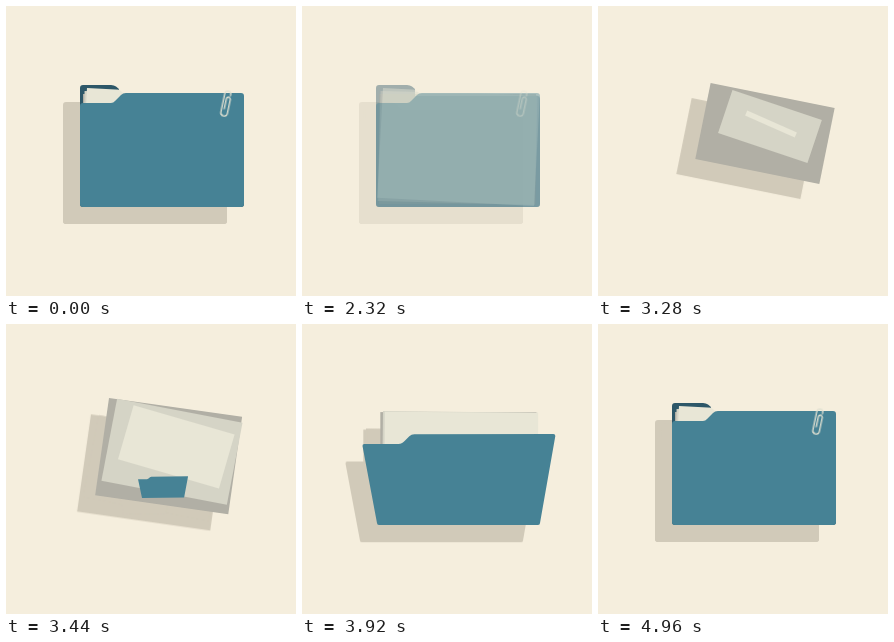
Write an HTML page that moves like this. It is 290 by 290 pixels and loops after 5 s.

```html
<!DOCTYPE html>
<html lang="en">
<head>
<meta charset="utf-8">
<title>Folder</title>
<style>
html, body { margin: 0; width: 100%; height: 100%; overflow: hidden; background: #f5eedd; }
svg { display: block; width: 100vw; height: 100vh; }

/* Every part runs on the same five second loop. */
.part, .sheet, .front, .back, .clip, .shade, .mask {
  animation: 5s linear infinite backwards;
}

/* Parts dissolve one by one; the shadow dissolves as a whole. */
.part { --a: 1; animation-name: var(--fade, fade); }
.late { --a: 0; }
@keyframes fade {
  0%, 40% { opacity: 1; animation-timing-function: cubic-bezier(.61, 1, .88, 1); }
  56%, 58.29% { opacity: 0; }
  58.3%, 60.7% { opacity: var(--a); }
  60.75%, 100% { opacity: 1; }
}
@keyframes gate {
  0%, 55.9% { opacity: 1; }
  56%, 58.29% { opacity: 0; }
  58.3%, 60.7% { opacity: var(--a); }
  60.75%, 100% { opacity: 1; }
}

.shade { --tint: #d1cab9; --fade: gate; animation-name: shade; }
@keyframes shade {
  0%, 40% { opacity: 1; transform: translate(-17px, 17px); animation-timing-function: cubic-bezier(.61, 1, .88, 1); }
  56% { opacity: 0; transform: translate(-17px, 17px); }
  58.29% { opacity: 0; transform: translate(1px, 13px); }
  58.3%, 58.4% { opacity: 1; transform: translate(1px, 13px); }
  65.6% { opacity: 1; transform: translate(-19px, 15px); }
  72.8% { opacity: 1; transform: translate(-17px, 18px); }
  83%, 100% { opacity: 1; transform: translate(-17px, 17px); }
}

/* Sheets share one flight, staggered by their delay. */
.sheet {
  --rest: translate(var(--x), var(--y)) rotate(var(--r)) scale(1.57, 1.1);
  animation-name: land;
}
.one { --x: 155.5px; --y: 143px; --r: 0deg; }
.two { --x: 155.6px; --y: 142px; --r: 1.5deg; animation-delay: .12s; }
.three { --x: 156.5px; --y: 141px; --r: 3deg; animation-delay: .24s; }
@keyframes land {
  0%, 55.9% { transform: var(--rest); }
  55.91%, 58.29% { transform: translate(141.5px, 136px) rotate(-40deg) scale(0, 0); }
  58.3%, 58.4% { transform: translate(141.5px, 136px) rotate(-40deg) scale(.305, .025); }
  60.8% { transform: translate(173px, 118px) rotate(24deg) scale(.54, .05); }
  63.2% { transform: translate(172px, 120.5px) rotate(18.6deg) scale(.94, .45); }
  65.6% { transform: translate(167px, 127.5px) rotate(11.4deg) scale(1.265, .775); }
  68% { transform: translate(164px, 128px) rotate(9.7deg) scale(1.3, .95); }
  70.4% { transform: translate(160px, 140px) rotate(5deg) scale(1.43, 1.05); }
  72.8% { transform: translate(159.5px, 143.5px) rotate(0deg) scale(1.53, 1.1); }
  80%, 100% { transform: var(--rest); }
}

/* Keeps the tucked sheets within the tab. */
.mask { animation-name: mask; }
@keyframes mask {
  0%, 56% { d: path("M0 0L108 0L108 79L117 87L290 87L290 290L0 290Z"); }
  56.1%, 83.2% { d: path("M0 0L108 0L108 0L117 0L290 0L290 290L0 290Z"); }
  83.3% { d: path("M0 0L108 0L108 78L117 79L290 79L290 290L0 290Z"); }
  88%, 100% { d: path("M0 0L108 0L108 79L117 87L290 87L290 290L0 290Z"); }
}

.front {
  --closed: path("M74 100Q74 97 77 97L105 97Q107.500 97 109 95L115 89Q117 87 120 87L235 87Q238 87 238 90L238 198Q238 201 235 201L77 201Q74 201 74 198Z");
  d: var(--closed);
  animation-name: swing;
}
@keyframes swing {
  0%, 55.9% { d: var(--closed); }
  56%, 68% {
    d: path("M157 165Q157 165 157 165L157 165Q157 165 157 165L157 165Q157 165 157 165L157 165Q157 165 157 165L157 165Q157 165 157 165L157 165Q157 165 157 165Z");
    animation-timing-function: ease-out;
  }
  72.8% { d: path("M63.500 129Q63 128 64 128L97 128Q101 128 104 125L108 121Q110 119 113 119L250 117Q251 117 251 118L236.500 196Q236 197 235 197L79 199Q78 199 78 198Z"); }
  75.2% { d: path("M59.500 128Q59 126 61 126L95 126Q99 126 102 123L106 119Q108 117 111 117L252 116Q254 116 254 118L238 199Q238 201 236 201L77 201Q75 201 75 199Z"); }
  80% { d: path("M61 119Q61 117 63 117L97 117Q101 117 104 113L108 109Q110 107 113 107L251 107Q253 107 253 109L238 199Q238 201 236 201L77 201Q75 201 75 199Z"); }
  83.2% {
    d: path("M69 100Q69 97 72 97L102 97Q105 97 107 95L112 89Q114 87 117 87L240 87Q243 87 243 90L238 198Q238 201 235 201L78 201Q75 201 75 198Z");
    animation-timing-function: ease-out;
  }
  89% { d: var(--closed); }
  93% { d: path("M73 100Q73 97 76 97L104 97Q107 97 109 95L115 89Q117 87 120 87L236 87Q239 87 239 90L238 198Q238 201 235 201L77 201Q74 201 74 198Z"); }
  99%, 100% { d: var(--closed); }
}

.back { transform-origin: 156px 140px; animation-name: grow; }
@keyframes grow {
  0%, 55.9% { transform: scale(1); }
  56%, 78% { transform: scale(0); animation-timing-function: ease-out; }
  83.2% { transform: scale(.972); }
  88%, 100% { transform: scale(1); }
}

.clip { animation-name: pin; }
@keyframes pin {
  0%, 55.9% { transform: translate(220.5px, 98px) rotate(12deg) scale(1); }
  56%, 80% { transform: translate(224px, 98px) rotate(12deg) scale(0); animation-timing-function: ease-out; }
  82.8%, 83.2% { transform: translate(223.8px, 98px) rotate(12deg) scale(1); }
  89% { transform: translate(220.5px, 98px) rotate(12deg) scale(1); }
  93% { transform: translate(221.3px, 98px) rotate(12deg) scale(1); }
  99%, 100% { transform: translate(220.5px, 98px) rotate(12deg) scale(1); }
}

.one { fill: var(--tint, #b1afa5); }
.two { fill: var(--tint, #d5d4c6); }
.three { fill: var(--tint, #e8e6d6); }
.front { fill: var(--tint, #468295); }
.back { fill: var(--tint, #2d5768); }
.clip { fill: none; stroke: #e4e3d3; stroke-width: 1.3; stroke-linecap: round; }
</style>
</head>
<body>
<svg viewBox="0 0 290 290">
  <clipPath id="tab"><path class="mask" d="M0 0L108 0L108 79L117 87L290 87L290 290L0 290Z"/></clipPath>
  <g class="shade"></g>
  <g class="stack">
    <g class="part"><path class="back" d="M74 82Q74 79 77 79H105Q108 79 110 80.5L113 83L113 90H235Q238 90 238 93V198Q238 201 235 201H77Q74 201 74 198Z"/></g>
    <g clip-path="url(#tab)">
      <g class="part"><rect class="sheet one" x="-50" y="-50" width="100" height="100"/></g>
      <g class="part"><rect class="sheet two" x="-50" y="-50" width="100" height="100"/></g>
      <g class="part late"><rect class="sheet three" x="-50" y="-50" width="100" height="100"/></g>
    </g>
    <g class="part"><path class="front"/></g>
  </g>
  <g class="part"><path class="clip" d="M-1.2 5V-5a2 2 0 0 1 4 0V9a3.3 3.3 0 0 1-6.6 0V-10a3 3 0 0 1 6 0v1"/></g>
</svg>
<script>
// The shadow is a one-colour copy of the stack with the same motion.
const stack = document.querySelector(".stack");
document.querySelector(".shade").append(...stack.cloneNode(true).children);
</script>
</body>
</html>
```
